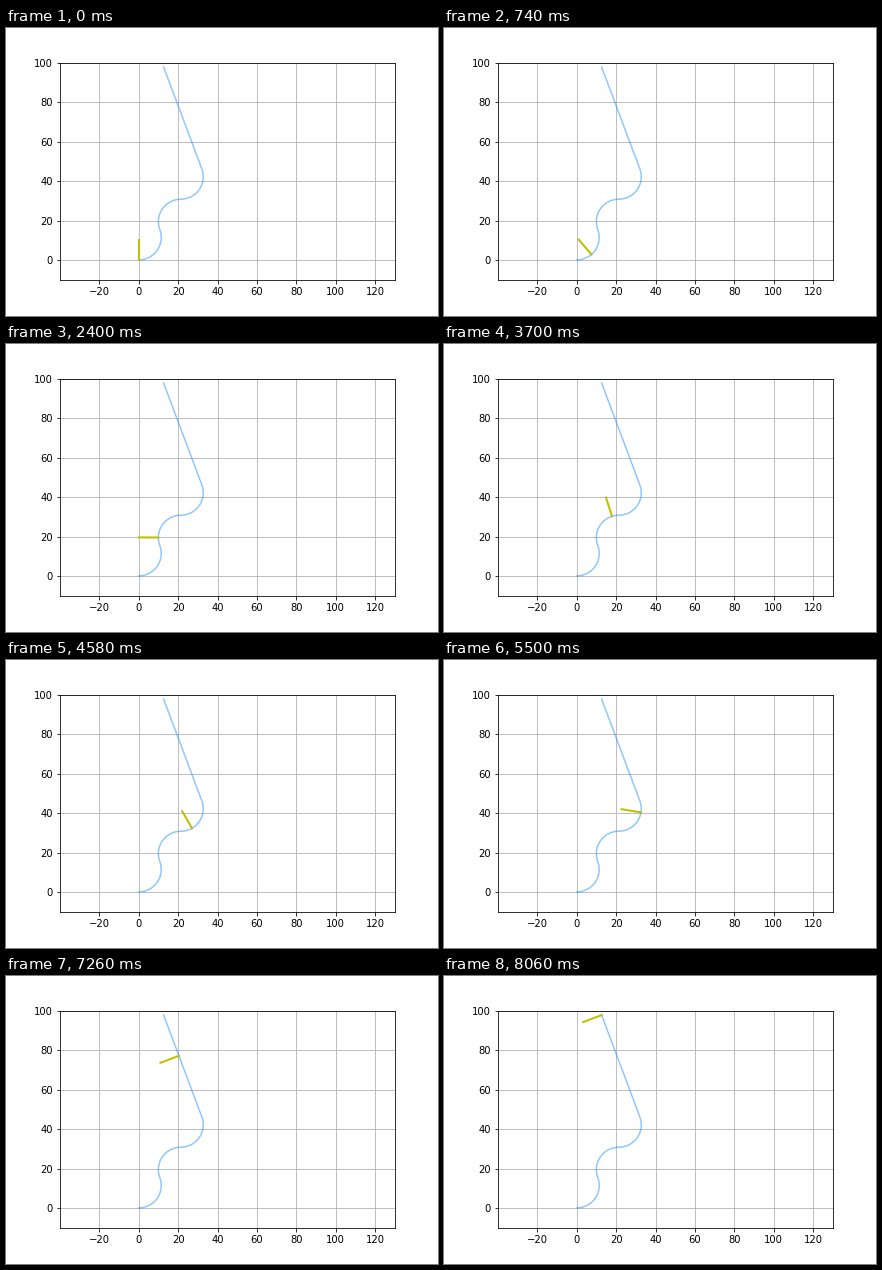
Animation, 432 px wide and 288 px high, one loop 8.08 s. Source, as a matplotlib script:

```python
import numpy as np
import matplotlib.pyplot as plt
from matplotlib.animation import FuncAnimation

RADIUS = 11.4
ARC = 22.0
STRAIGHT = 55.2
STEPS = 101
NORMAL = 10

# (length, curvature) of each leg
LEGS = [(ARC, 1 / RADIUS), (ARC, -1 / RADIUS), (ARC, 1 / RADIUS), (STRAIGHT, 0)]


def leg(x, y, heading, length, curve):
    """Poses sampled evenly along one arc or straight line."""
    s = np.linspace(0, length, STEPS)
    h = heading + curve * s
    if curve:
        xs = x + (np.sin(h) - np.sin(heading)) / curve
        ys = y - (np.cos(h) - np.cos(heading)) / curve
    else:
        xs = x + s * np.cos(heading)
        ys = y + s * np.sin(heading)
    return np.column_stack([xs, ys, h])


def drive():
    pose, parts = (0, 0, 0), []
    for length, curve in LEGS:
        parts.append(leg(*pose, length, curve))
        pose = parts[-1][-1]
    return np.vstack(parts)


poses = drive()

fig, ax = plt.subplots(figsize=(6, 4), dpi=72)
fig.subplots_adjust(left=0.125, right=0.9, bottom=0.125, top=0.88)
ax.set_aspect("equal")
ax.set_xlim(-40, 130)
ax.set_ylim(-10, 100)
ax.set_xticks(range(-20, 121, 20))
ax.set_yticks(range(0, 101, 20))
ax.grid(True)

ax.plot(poses[:, 0], poses[:, 1], color="dodgerblue", alpha=0.5, lw=1.5)
stick, = ax.plot([], [], color="y", lw=2)


def update(i):
    x, y, h = poses[i]
    stick.set_data([x, x - NORMAL * np.sin(h)], [y, y + NORMAL * np.cos(h)])
    return stick,


anim = FuncAnimation(fig, update, frames=len(poses), interval=20,
                     repeat=True, repeat_delay=0)
plt.show()
```
